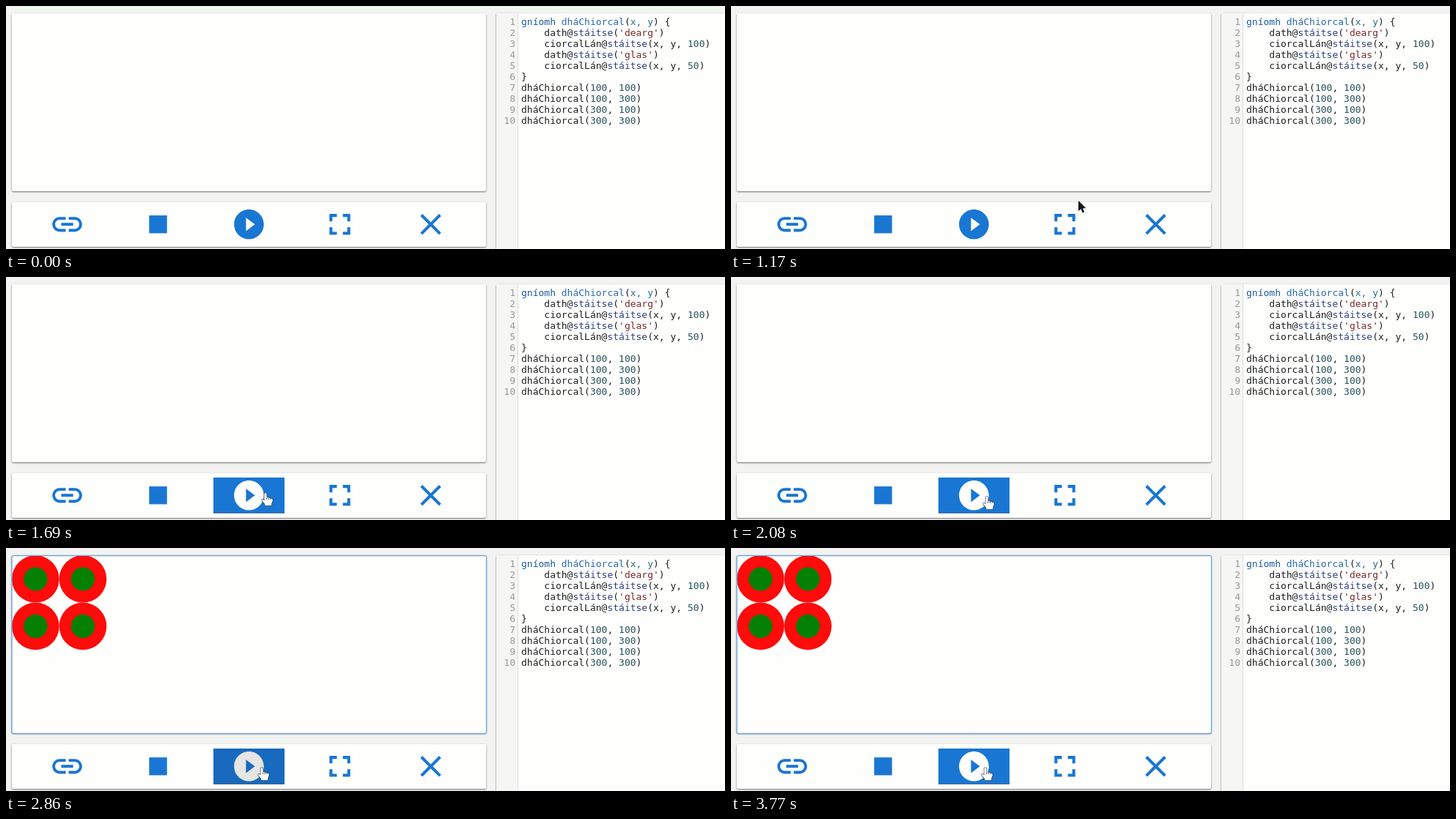
Recreate the animation shown at these times as an HTML page with a canvas. Size 981 by 332 pixels, loop 4160 ms.

```html
<!DOCTYPE html>
<html lang="ga">
<head>
<meta charset="utf-8">
<title>Dhá chiorcal</title>
<style>
html, body { margin: 0; width: 100%; height: 100%; overflow: hidden; background: #f3f3f2; }
canvas { display: block; }
</style>
</head>
<body>
<canvas id="stage" width="981" height="332"></canvas>
<script>
const ctx = document.getElementById('stage').getContext('2d');
const LOOP = 4160, STEP = 130;
const BLUE = '#1976d2', PAPER = '#fefefd';
const INK = '#1c1f20', KEYWORD = '#1d5a98', DEF = '#2a69ac', PARAM = '#2f6f86',
      MEMBER = '#2f407c', STRING = '#7b2727', NUMBER = '#2b5459';

// Icons on a 24-unit grid
const icons = {
  link: 'M3.9 12c0-1.71 1.39-3.1 3.1-3.1h4V7H7c-2.76 0-5 2.24-5 5s2.24 5 5 5h4v-1.9H7c-1.71 0-3.1-1.39-3.1-3.1zM8 13h8v-2H8v2zm9-6h-4v1.9h4c1.71 0 3.1 1.39 3.1 3.1s-1.39 3.1-3.1 3.1h-4V17h4c2.76 0 5-2.24 5-5s-2.24-5-5-5z',
  stop: 'M6 6h12v12H6z',
  play: 'M12 2C6.48 2 2 6.48 2 12s4.48 10 10 10 10-4.48 10-10S17.52 2 12 2zm-2 14.5v-9l6 4.5-6 4.5z',
  full: 'M7 14H5v5h5v-2H7v-3zm-2-4h2V7h3V5H5v5zm12 7h-3v2h5v-5h-2v3zM14 5v2h3v3h2V5h-5z',
  close: 'M19 6.41L17.59 5 12 10.59 6.41 5 5 6.41 10.59 12 5 17.59 6.41 19 12 13.41 17.59 19 19 17.59 13.41 12z'
};
const arrow = new Path2D('M0 0V14.2L3.3 11.2 5.6 16.6 8.2 15.5 5.9 10.2H10.3Z');
const hand = new Path2D('M-1.6 1.2Q0-1 1.6 1.2V6L5.5 6.8 9 8Q10 8.5 9.7 11L8.3 14.6V17.2H-.8V15.3L-4.6 10.8Q-5.4 8.6-3.6 8.6L-1.6 10.4Z');

const code = [
  [['gníomh ', KEYWORD], ['dháChiorcal', DEF], ['('], ['x', PARAM], [', ', PARAM], ['y', PARAM], [') {']],
  ...[['dearg', 100], ['glas', 50]].flatMap(([colour, radius]) => [
    [['    dath@'], ['stáitse', MEMBER], ['('], [`'${colour}'`, STRING], [')']],
    [['    ciorcalLán@'], ['stáitse', MEMBER], ['(x, y, '], [String(radius), NUMBER], [')']]
  ]),
  [['}']],
  ...[100, 300].flatMap(x => [100, 300].map(y =>
    [['dháChiorcal('], [String(x), NUMBER], [', '], [String(y), NUMBER], [')']]))
];

// Pointer stops: time, x, y
const pointer = [
  [780, 788, 221], [910, 708, 243], [1040, 588, 258], [1170, 474, 266], [1300, 394, 275],
  [1430, 365, 281], [1560, 359, 288], [1690, 354, 295], [1820, 351, 299], [2080, 349, 300],
  [3640, 348, 300], [3770, 347, 300]
];

function rect(x, y, w, h, fill) {
  ctx.fillStyle = fill;
  ctx.fillRect(x, y, w, h);
}

function disc(x, y, r, fill) {
  ctx.fillStyle = fill;
  ctx.beginPath();
  ctx.arc(x, y, r, 0, 2 * Math.PI);
  ctx.fill();
}

function card(x, y, w, h) {
  ctx.save();
  ctx.fillStyle = PAPER;
  for (const [blur, alpha] of [[3, .2], [2, .4]]) {
    ctx.shadowColor = `rgba(0,0,0,${alpha})`;
    ctx.shadowBlur = blur;
    ctx.shadowOffsetY = 1;
    ctx.beginPath();
    ctx.roundRect(x, y, w, h, 2);
    ctx.fill();
  }
  ctx.restore();
}

function icon(name, x, fill) {
  ctx.save();
  ctx.translate(x, 298.3);
  ctx.scale(2.03, 2.03);
  ctx.translate(-12, -12);
  ctx.fillStyle = fill;
  ctx.fill(new Path2D(icons[name]));
  ctx.restore();
}

function drawCode() {
  card(669, 10, 330, 340);
  rect(669, 10, 30, 322, '#f6f6f5');
  rect(698, 10, 1, 322, '#dddddc');
  ctx.font = '13px "DejaVu Sans Mono", monospace';
  const advance = ctx.measureText('0').width;
  code.forEach((line, row) => {
    const y = 26 + 15 * row;
    ctx.textAlign = 'right';
    ctx.fillStyle = '#999';
    ctx.fillText(row + 1, 695, y);
    ctx.textAlign = 'left';
    let x = 703;
    for (const [text, colour = INK] of line) {
      ctx.fillStyle = colour;
      ctx.fillText(text, x, y);
      x += text.length * advance;
    }
  });
}

function drawOutput() {
  const scale = .323;
  for (const x of [100, 300]) for (const y of [100, 300]) {
    disc(8 + x * scale, 10 + y * scale, 100 * scale, '#fe0b0b');
    disc(8 + x * scale, 10 + y * scale, 50 * scale, '#048004');
  }
  ctx.save();
  ctx.strokeStyle = '#68a3d9';
  ctx.shadowColor = 'rgba(25,118,210,.4)';
  ctx.shadowBlur = 2;
  ctx.beginPath();
  ctx.roundRect(8, 10.5, 647.5, 243, 2);
  ctx.stroke();
  ctx.restore();
}

function drawRipple(t) {
  const grow = Math.min(1.5, .35 + (t - 2470) / 130 * .7);
  const alpha = .15 * Math.min(1, Math.max(0, (3120 - t) / 390));
  ctx.save();
  ctx.beginPath();
  ctx.rect(283, 274, 97, 48.5);
  ctx.clip();
  ctx.fillStyle = `rgba(0,0,0,${alpha})`;
  ctx.beginPath();
  ctx.ellipse(331.5, 298.3, 49 * grow, 24.5 * grow, 0, 0, 2 * Math.PI);
  ctx.fill();
  ctx.restore();
}

function drawToolbar(t) {
  const hover = t >= 1430;
  card(8, 268, 647, 61);
  if (hover) {
    rect(283, 274, 97, 49, BLUE);
    rect(283, 322, 97, 1, '#4b6b8d');
  }
  Object.keys(icons).forEach((name, i) =>
    icon(name, 83.5 + 124 * i, hover && name === 'play' ? PAPER : BLUE));
  if (t >= 2470 && t < 3120) drawRipple(t);
}

function drawPointer(t) {
  const stop = pointer.findLast(([start]) => t >= start);
  if (!stop) return;
  const [, x, y] = stop, pressing = t >= 1430;
  const shape = pressing ? hand : arrow;
  ctx.save();
  ctx.translate(x, y);
  ctx.lineJoin = 'round';
  ctx.lineWidth = pressing ? 1.2 : 2;
  ctx.strokeStyle = pressing ? '#27313b' : '#fff';
  ctx.stroke(shape);
  ctx.fillStyle = pressing ? '#fff' : '#151515';
  ctx.fill(shape);
  if (pressing) {
    ctx.lineWidth = .8;
    ctx.beginPath();
    for (const dx of [1.7, 4.4, 7]) {
      ctx.moveTo(dx, 6.5);
      ctx.lineTo(dx, 9.2);
    }
    ctx.stroke();
  }
  ctx.restore();
}

function draw(now) {
  const t = Math.floor(now % LOOP / STEP) * STEP;
  rect(0, 0, 981, 332, '#f3f3f2');
  if (t < 130) rect(0, 0, 981, 2, '#eafae6');
  card(8, 10, 647, 243);
  if (t >= 2860) drawOutput();
  drawToolbar(t);
  drawCode();
  drawPointer(t);
}

const start = performance.now();
function tick() {
  draw(performance.now() - start);
  requestAnimationFrame(tick);
}
tick();
</script>
</body>
</html>
```
